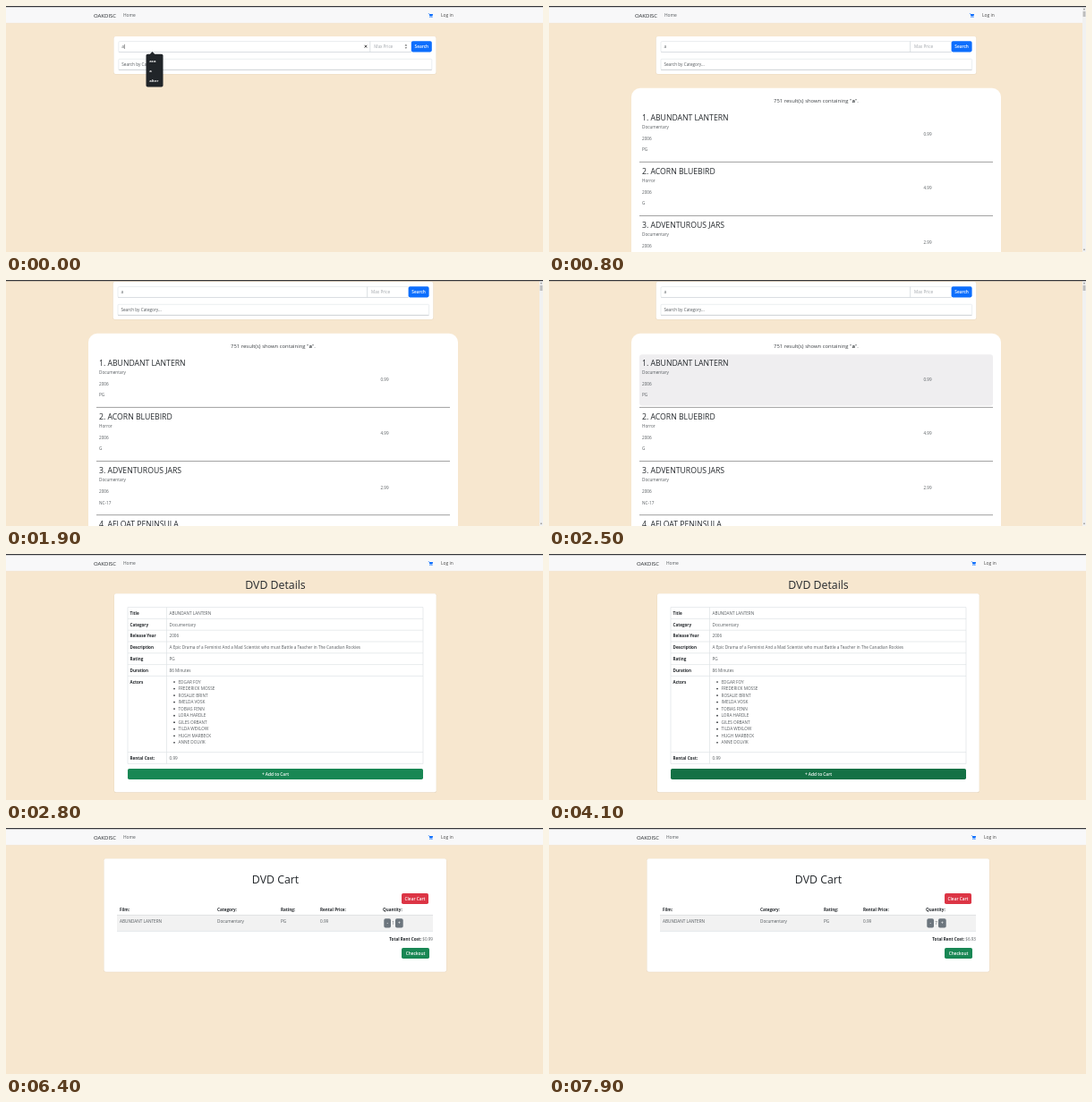
Animation of 600x275 px, one loop 8 s. Source, as an HTML page:

```html
<!DOCTYPE html>
<html lang="en">
<head>
<meta charset="utf-8">
<title>DVD rental</title>
<style>
  html, body { margin: 0; width: 100%; height: 100%; overflow: hidden; background: #f7e7cf; }
  svg { display: block; width: 100vw; height: 100vh; }
  text { font-family: "Open Sans", "Noto Sans", sans-serif; white-space: pre; }
</style>
</head>
<body>
<svg id="stage" viewBox="0 0 600 275"></svg>
<script>
const LOOP = 8000;
const INK = '#24282c', SOFT = '#555a5e', LINE = '#dee2e6';
const BLUE = '#0d6efd', GREEN = [25, 135, 84], GREEN_HOVER = [20, 113, 69];
const FIRST_FILM = 'ABUNDANT LANTERN';
const stage = document.getElementById('stage');

function add(parent, tag, attrs, content) {
  const el = document.createElementNS('http://www.w3.org/2000/svg', tag);
  for (const key in attrs) el.setAttribute(key, attrs[key]);
  if (content !== undefined) el.textContent = content;
  parent.appendChild(el);
  return el;
}
const group = (parent) => add(parent, 'g', {});
const rect = (p, x, y, x2, y2, fill, rx = 0, more = {}) =>
  add(p, 'rect', { x, y, width: x2 - x, height: y2 - y, fill, rx, ...more });
const line = (p, x, y, x2, y2, stroke = LINE, width = 0.7) =>
  add(p, 'path', { d: `M${x} ${y}L${x2} ${y2}`, stroke, 'stroke-width': width });
const text = (p, x, y, str, size = 4.7, fill = SOFT, more = {}) =>
  add(p, 'text', { x, y, 'font-size': size, fill, ...more }, str);
const bold = (p, x, y, str) => text(p, x, y, str, 4.6, INK, { 'font-weight': 700 });
const middle = { 'text-anchor': 'middle' };

function button(p, x, y, x2, y2, fill, label) {
  const box = rect(p, x, y, x2, y2, fill, 1.8);
  text(p, (x + x2) / 2, (y + y2) / 2 + 1.7, label, 4.8, '#fff', { ...middle, 'font-weight': 600 });
  return box;
}

function card(p, x, y, x2, y2, rx = 2) {
  rect(p, x - 0.4, y, x2 + 0.4, y2 + 0.6, '#e9d9c2', rx);
  rect(p, x, y, x2, y2, '#fff', rx);
}

function navbar(p, shift = 0) {
  rect(p, 0, 0, 600, 19, '#f8f8f9');
  line(p, 0, 19.2, 600, 19.2, '#efe3d2', 0.5);
  const g = add(p, 'g', { transform: `translate(${shift} 0)` });
  text(g, 98, 12.5, 'OAKDISC', 6, INK);
  text(g, 131, 12, 'Home', 4.9, SOFT);
  add(g, 'path', { d: 'M471.8 8.2h1l.3.8h4l-.7 2.5h-3l-.7-2.8h-.9z', fill: BLUE });
  add(g, 'circle', { cx: 473.9, cy: 12.5, r: 0.6, fill: BLUE });
  add(g, 'circle', { cx: 475.9, cy: 12.5, r: 0.6, fill: BLUE });
  text(g, 486, 12, 'Log in', 4.9, '#444');
}

// The search card takes 60% of the page width.
function searchCard(p, width) {
  const left = width * 0.2 + 0.5, right = width * 0.8 + 0.5;
  const x = left + 5.3, x2 = right - 4.7;
  card(p, left, 34, right, 76);
  rect(p, x, 39.5, x2 - 22, 51.5, '#fff', 1.5, { stroke: LINE, 'stroke-width': 0.6 });
  line(p, x, 51.5, x2 - 23, 51.5, '#cfd3d8', 0.6);
  line(p, x2 - 69, 39.5, x2 - 69, 51.5, '#ced4da');
  text(p, left + 8.7, 47, 'a');
  text(p, x2 - 64.5, 47, 'Max Price', 4.6, '#a0a5aa');
  button(p, x2 - 23, 39.2, x2, 51.4, BLUE, 'Search');
  rect(p, x, 59.3, x2, 71.3, '#fff', 1, { stroke: LINE, 'stroke-width': 0.6 });
  line(p, x, 71.4, x2, 71.4, '#c4c8cc');
  text(p, left + 8.7, 67.2, 'Search by Category...');
}

function buildSearch() {
  const g = group(stage);
  navbar(g);
  searchCard(g, 600);
  line(g, 132.4, 42.8, 132.4, 48, '#333', 0.5);
  add(g, 'path', { d: 'M400.6 43.8l2.6 2.8m0-2.8l-2.6 2.8', stroke: '#333', 'stroke-width': 0.9 });
  add(g, 'path', { d: 'M445.6 44.4l1.3-1.6 1.3 1.6zm0 1.8l1.3 1.6 1.3-1.6z', fill: '#666' });
  add(g, 'path', { d: 'M160.5 54.2l3-3.2 3 3.2z', fill: '#212529' });
  rect(g, 156.5, 53.8, 175.5, 90.5, '#212529', 1.8);
  ['aca', 'a', 'alter'].forEach((word, i) =>
    text(g, 160.3, 62.8 + i * 11.2, word, 4.2, '#fff', { 'font-weight': 700 }));
  return { g };
}

function buildResults() {
  const g = group(stage), page = group(g);
  navbar(page, -2);
  searchCard(page, 596);
  rect(page, 92, 91.7, 505, 400, '#fff', 10);
  const title = text(page, 298.5, 108, '751 result(s) shown containing "', 5.9, '#3c4044', middle);
  add(title, 'tspan', { 'font-weight': 700 }, 'a');
  add(title, 'tspan', {}, '".');
  const hover = rect(page, 101, 115.3, 496, 172.5, '#efeef0', 3);
  const films = [
    [FIRST_FILM, 'Documentary', 'PG', '0.99'],
    ['ACORN BLUEBIRD', 'Horror', 'G', '4.99'],
    ['ADVENTUROUS JARS', 'Documentary', 'NC-17', '2.99'],
    ['AFLOAT PENINSULA', 'Horror', 'G', '2.99']
  ];
  films.forEach(([name, genre, rating, price], i) => {
    const y = i * 60.15;
    text(page, 104, y + 127.5, `${i + 1}. ${name}`, 8.67, INK);
    text(page, 104, y + 137.1, genre);
    text(page, 104, y + 149.9, '2006');
    text(page, 104, y + 162.2, rating);
    text(page, 418.5, y + 145.2, price, 4.6);
    line(page, 101, y + 174.4, 496, y + 174.4, '#777');
  });
  rect(g, 596, 1, 600, 275, '#f1f1f1');
  add(g, 'path', { d: 'M597 4.2l1-1.6 1 1.6zm0 267.6l1 1.6 1-1.6z', fill: '#777' });
  const thumb = rect(g, 596.6, 6, 599.5, 12, '#bdbdbd');
  return { g, page, hover, thumb };
}

function buildDetails() {
  const g = group(stage);
  navbar(g);
  text(g, 301, 39, 'DVD Details', 12.3, INK, { ...middle, 'font-weight': 500 });
  card(g, 121, 44.3, 480.7, 266.3);
  const edges = [59.6, 72.4, 85.2, 98, 110.8, 123.6, 136.4, 221.6, 234.4];
  edges.forEach(y => line(g, 136, y, 466, y));
  [136, 179.5, 466].forEach(x => line(g, x, 59.6, x, 234.4));
  const rows = [
    ['Title', FIRST_FILM], ['Category', 'Documentary'], ['Release Year', '2006'],
    ['Description', 'A Epic Drama of a Feminist And a Mad Scientist who must Battle a Teacher in The Canadian Rockies'],
    ['Rating', 'PG'], ['Duration', '86 Minutes'], ['Actors', ''], ['Rental Cost:', '0.99']
  ];
  rows.forEach(([label, value], i) => {
    bold(g, 138.5, edges[i] + 8.1, label);
    text(g, 182.5, edges[i] + 8.1, value, 4.65);
  });
  const actors = ['EDGAR FOY', 'FREDERICK MOSSE', 'ROSALIE BRINT', 'IMELDA VOSK', 'TOBIAS FENN',
    'LORA HARDLE', 'GILES ORBANT', 'TILDA WEXLOW', 'HUGH MARBECK', 'ANNE DOLVIK'];
  actors.forEach((name, i) => {
    const y = 144.6 + i * 7.53;
    add(g, 'circle', { cx: 188, cy: y - 1.6, r: 0.85, fill: INK });
    text(g, 192.5, y, name);
  });
  return { g, buy: button(g, 136, 240, 466, 252, '#198754', '+ Add to Cart') };
}

function buildCart() {
  const g = group(stage);
  navbar(g);
  card(g, 109.5, 34.3, 492, 160.7);
  text(g, 301, 61.8, 'DVD Cart', 12.3, INK, { ...middle, 'font-weight': 500 });
  button(g, 442, 73, 472, 85, '#dc3545', 'Clear Cart');
  rect(g, 124, 97.4, 477, 115.3, '#f2f2f2');
  line(g, 124, 97.4, 477, 97.4, '#cfd2d5', 0.6);
  line(g, 124, 115.4, 477, 115.4);
  const columns = [[127, 'Film:', FIRST_FILM], [236, 'Category:', 'Documentary'],
    [307, 'Rating:', 'PG'], [351, 'Rental Price:', '0.99'], [421, 'Quantity:', '']];
  columns.forEach(([x, head, value]) => {
    bold(g, x, 93.2, head);
    text(g, x, 105.7, value);
  });
  button(g, 422.3, 101.3, 430, 111.5, '#6c757d', '-');
  button(g, 435, 101.3, 443.7, 111.5, '#6c757d', '+');
  const count = text(g, 432.6, 108, '1', 4.6, SOFT, middle);
  const sum = text(g, 477, 125.7, '', 4.6, SOFT, { 'text-anchor': 'end' });
  add(sum, 'tspan', { 'font-weight': 700, fill: INK }, 'Total Rent Cost: ');
  const total = add(sum, 'tspan', {}, '');
  button(g, 442, 134, 473, 146, '#198754', 'Checkout');
  return { g, count, total };
}

const search = buildSearch(), results = buildResults(), details = buildDetails(), cart = buildCart();
const scenes = [[search, 0], [results, 300], [details, 2800], [cart, 6000]];
rect(stage, 0, 0, 600, 1.2, '#35363a');

const ramp = (t, from, length) => Math.min(1, Math.max(0, (t - from) / length));

function draw(t) {
  scenes.forEach(([scene, start], i) => {
    const end = i + 1 < scenes.length ? scenes[i + 1][1] : LOOP;
    scene.g.style.display = t >= start && t < end ? '' : 'none';
  });

  const scroll = 32 * (1 - (1 - ramp(t, 1100, 600)) ** 3);
  results.page.setAttribute('transform', `translate(0 ${-scroll})`);
  results.hover.setAttribute('opacity', ramp(t, 2300, 150));

  const shade = ramp(t, 3750, 150) - ramp(t, 4650, 150);
  const mix = GREEN.map((c, i) => Math.round(c + (GREEN_HOVER[i] - c) * shade));
  details.buy.setAttribute('fill', `rgb(${mix})`);

  const clicks = Math.max(0, Math.floor((t - 7500) / 100));
  const count = [1, 3, 4, 6, 7][Math.min(4, clicks)];
  cart.count.textContent = count;
  cart.total.textContent = '$' + (count * 0.99).toFixed(2);
}

function tick(now) {
  draw(now % LOOP);
  requestAnimationFrame(tick);
}
draw(0);
requestAnimationFrame(tick);
</script>
</body>
</html>
```
